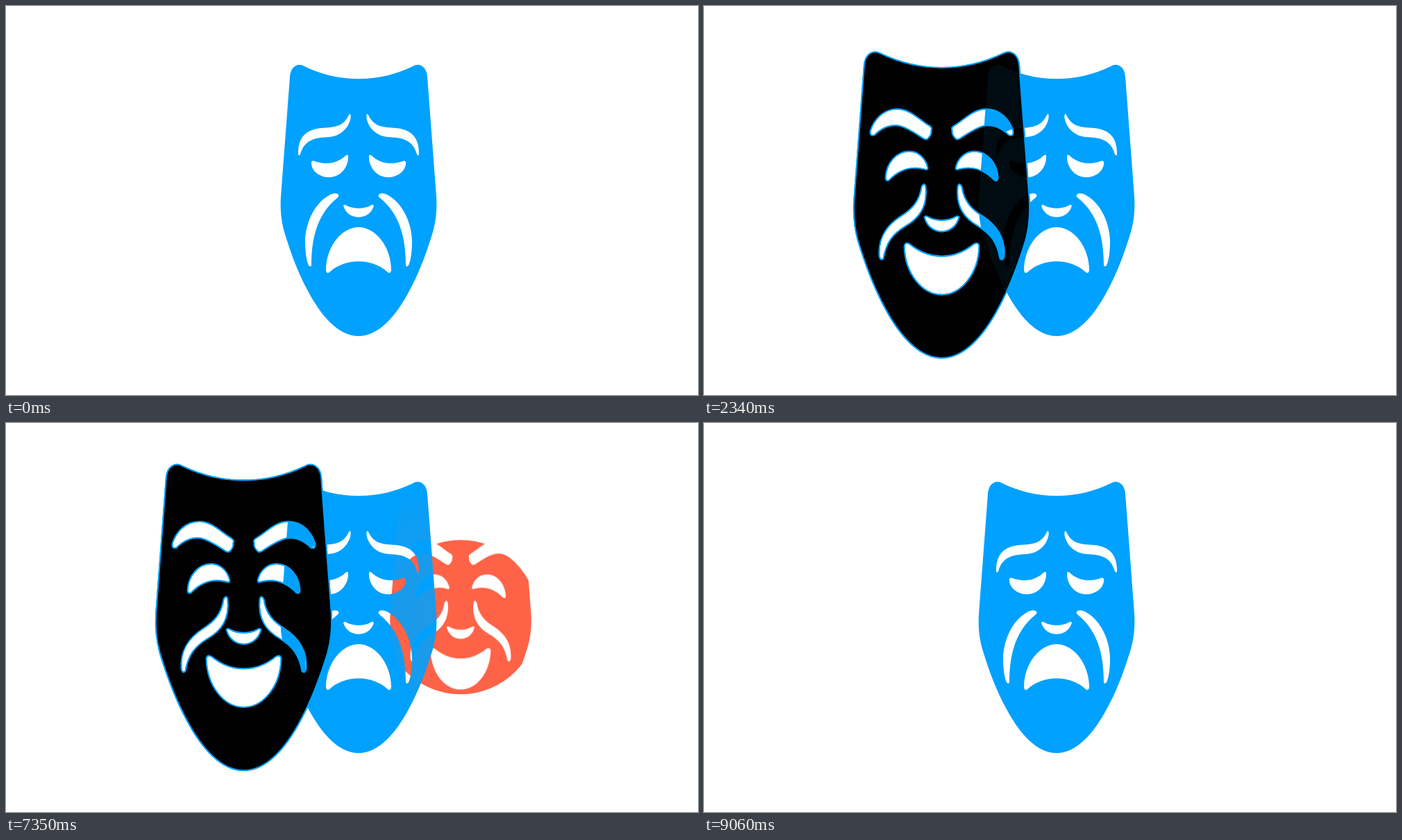
Write an HTML page that moves like this. It is 997 px wide and 561 px high and loops after 9.09 s.

```html
<!DOCTYPE html>
<html lang="en">
<head>
<meta charset="utf-8">
<title>Masks</title>
<style>
html, body { margin: 0; width: 100%; height: 100%; overflow: hidden; background: #fff; }
svg { display: block; width: 997px; height: 561px; }
</style>
</head>
<body>
<svg viewBox="0 0 997 561" xmlns="http://www.w3.org/2000/svg">
  <defs>
    <path id="sad" fill-rule="evenodd"/>
    <path id="happy" fill-rule="evenodd"/>
    <clipPath id="inSad"><use href="#sad" transform="translate(508 280)"/></clipPath>
    <clipPath id="iris"><circle id="hole" cx="655" cy="280" r="0"/></clipPath>
    <radialGradient id="glow" gradientUnits="userSpaceOnUse" cx="0" cy="0" r="276">
      <stop offset="0" stop-color="#ff6347" stop-opacity=".16"/>
      <stop offset="1" stop-color="#ff6347" stop-opacity="0"/>
    </radialGradient>
    <radialGradient id="edge" gradientUnits="userSpaceOnUse" cx="0" cy="0" r="200">
      <stop offset="0" stop-opacity="0"/>
      <stop offset="1" stop-opacity=".15"/>
    </radialGradient>
  </defs>
  <rect id="back" width="997" height="561"/>
  <g id="scene">
    <g id="red" clip-path="url(#iris)">
      <use href="#happy" transform="translate(655 280) scale(.803)" fill="#ff6347"/>
    </g>
    <use id="under" href="#happy" fill="#000" stroke="#00a1ff" stroke-width="2"/>
    <use href="#sad" transform="translate(508 280)" fill="#00a1ff"/>
    <g id="tint" clip-path="url(#inSad)">
      <use href="#happy" transform="translate(655 280) scale(.803)" fill="url(#glow)"/>
    </g>
    <use id="shade" href="#sad" transform="translate(508 280)" fill="url(#edge)"/>
    <g id="front">
      <use id="over" href="#happy" fill="#000" stroke="#00a1ff" stroke-width="2"/>
    </g>
  </g>
</svg>
<script>
const LOOP = 9090, FEATHER = 222;
const $ = id => document.getElementById(id);

// Apply factors to the x and y of every point in a path.
const scale = (d, kx, ky) => {
  let i = 0;
  return d.replace(/-?\d+(\.\d+)?/g, n => +(n * (i++ % 2 ? ky : kx)).toFixed(2));
};
const pair = d => d + scale(d, -1, 1);

const face =
  'M0,-175 C30,-175 55,-182 78,-193 C88,-199 98,-192 99,-178 L112,-5 ' +
  'C113,12 112,28 107,46 C96,82 86,107 73,131 C53,169 28,196 0,196 ' +
  'C-28,196 -53,169 -73,131 C-86,107 -96,82 -107,46 C-112,28 -113,12 -112,-5 ' +
  'L-99,-178 C-98,-192 -88,-199 -78,-193 C-55,-182 -30,-175 0,-175Z';

const sad = {
  brow: 'M12,-124 C9,-119 16,-93 43,-91 C62,-90 78,-88 84,-66 Q87,-62 87,-68 ' +
    'C87,-90 76,-102 54,-104 C34,-105 22,-106 14,-123 Q13,-125 12,-124Z',
  eye: 'M15,-64 C14,-48 26,-33 42,-33 C57,-33 69,-43 68,-55 Q67,-58 63,-56 ' +
    'C48,-51 32,-52 19,-64 Q16,-67 15,-64Z',
  cheek: 'M29,-5 C27,-10 34,-11 41,-8 C66,5 77,37 77,60 C77,75 75,88 72,94 ' +
    'Q69,97 68,94 C68,60 62,22 31,-3 Q30,-4 29,-5Z',
  nose: 'M-22,8 C-16,30 16,30 22,8 Q20,5 17,8 C6,13 -6,13 -17,8 Q-20,5 -22,8Z',
  mouth: 'M0,39 C25,39 47,68 47,101 Q46,107 42,104 C20,83 -20,83 -42,104 ' +
    'Q-46,107 -47,101 C-47,68 -25,39 0,39Z'
};

const happy = {
  brow: 'M15,-107 Q13,-111 18,-114 C32,-122 45,-138 64,-138 C85,-138 98,-122 103,-106 ' +
    'Q104,-98 97,-100 C86,-111 72,-117 59,-113 C46,-109 34,-100 26,-95 ' +
    'Q22,-93 20,-95 Q14,-101 15,-107Z',
  eye: 'M20,-53 C23,-66 33,-77 47,-77 C66,-77 80,-59 81,-39 Q81,-33 76,-35 ' +
    'C62,-50 44,-56 25,-51 Q20,-49 20,-53Z',
  cheek: 'M23,-26 Q25,-33 29,-26 C32,-4 44,7 58,16 C80,30 92,48 90,75 ' +
    'Q88,82 84,78 C80,54 70,42 52,31 C33,20 20,4 23,-26Z',
  nose: 'M-25,18 C-18,46 18,46 25,18 Q23,15 19,18 C8,24 -8,24 -19,18 Q-23,15 -25,18Z',
  mouth: 'M-54,60 Q-53,53 -46,57 C-18,80 18,80 46,57 Q53,53 54,60 ' +
    'C53,100 28,130 0,130 C-28,130 -53,100 -54,60Z'
};

const mask = (outline, f) =>
  outline + pair(f.brow) + pair(f.eye) + pair(f.cheek) + f.nose + f.mouth;
$('sad').setAttribute('d', mask(face, sad));
$('happy').setAttribute('d', mask(scale(face, 1.128, 1.128), happy));

const ramp = (t, a, b) => Math.min(1, Math.max(0, (t - a) / (b - a)));
const show = (id, on) => $(id).setAttribute('visibility', on ? 'visible' : 'hidden');

function darkness(t) {
  if (t < 8265) return (1 - Math.cos(Math.PI * ramp(t, 7320, 8250))) / 2;
  return (1 - ramp(t, 8280, 9060)) ** 2;
}

function draw(t) {
  const dark = darkness(t), reset = t >= 8265;
  $('back').setAttribute('fill', dark > .5 ? '#000' : '#fff');
  $('scene').style.filter = dark > 0 ? `brightness(${1 - dark})` : 'none';
  $('shade').setAttribute('opacity', dark);

  // Black mask: rises while fading in; solid off the blue once half opaque.
  const u = reset ? 0 : ramp(t, 600, 3000);
  const alpha = 1 - (1 - u) ** 2, solid = alpha >= .5;
  const place = `translate(342.5 ${280 + 309 * (1 - u) ** 3})`;
  $('under').setAttribute('transform', place);
  $('over').setAttribute('transform', place);
  $('front').setAttribute('opacity', alpha);
  if (solid) $('front').removeAttribute('clip-path');
  else $('front').setAttribute('clip-path', 'url(#inSad)');
  show('under', solid);
  show('front', u > 0);

  // Red mask: hard edge where its feathered opacity passes one half.
  const p = reset ? 0 : ramp(t, 3000, 5400);
  const need = 1 - .5 / Math.max(.01, 1 - dark);
  const r = p > 0 ? Math.max(0, FEATHER * (1 - need / p)) : 0;
  $('hole').setAttribute('r', Math.min(r, 600));
  show('red', r > 0);
  $('tint').setAttribute('opacity', p);
}

const start = performance.now();
function tick() {
  draw((performance.now() - start) % LOOP);
  requestAnimationFrame(tick);
}
draw(0);
requestAnimationFrame(tick);
</script>
</body>
</html>
```
